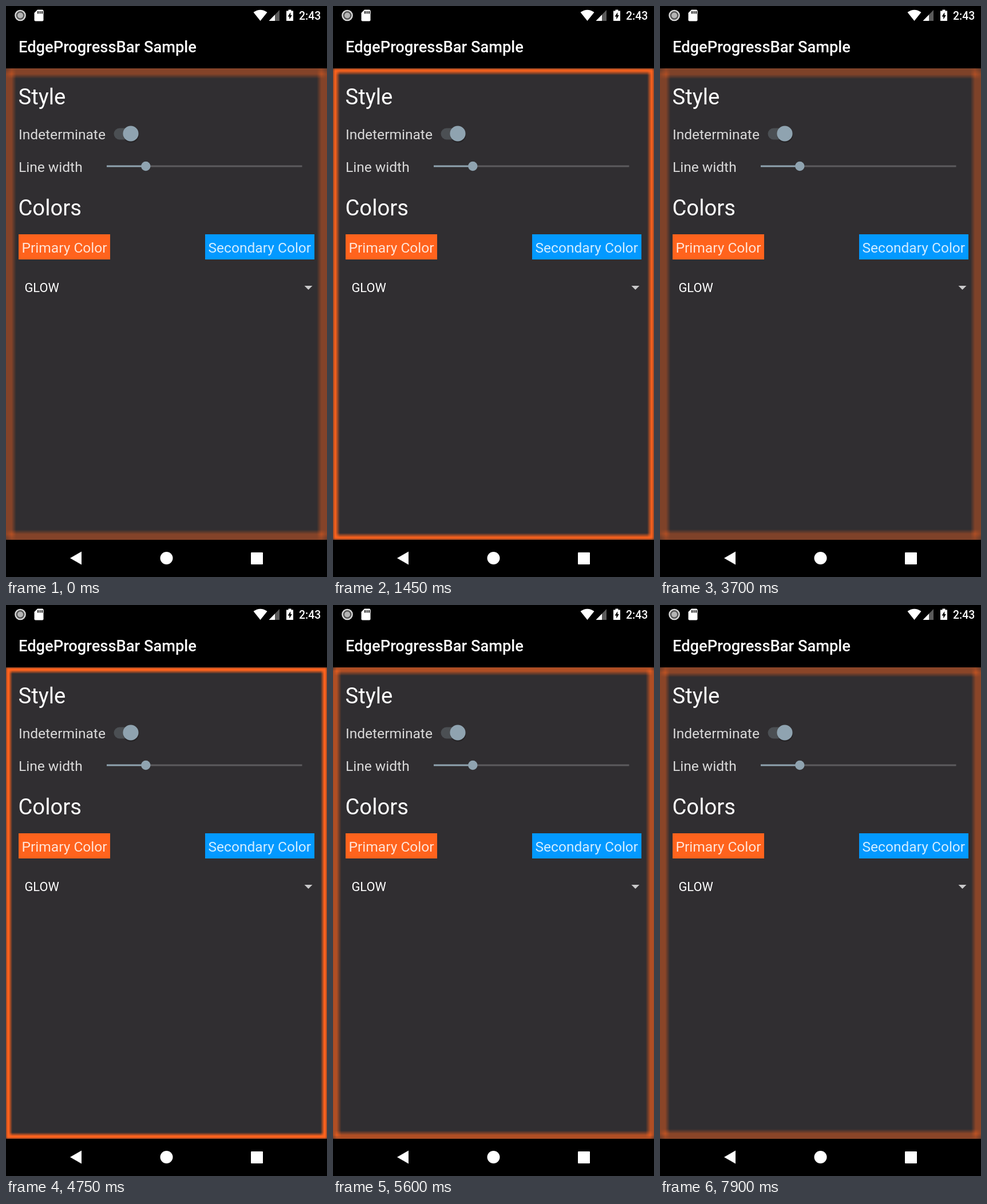
Animation of 561x998 px, one loop 8 s. Source, as an HTML page with a canvas:

```html
<!DOCTYPE html>
<html lang="en">
<head>
<meta charset="utf-8">
<title>EdgeProgressBar Sample</title>
<style>
  html, body { margin: 0; width: 100%; height: 100%; overflow: hidden; background: #000; }
  svg, canvas { position: absolute; left: 0; display: block; }
  svg { top: 0; }
  canvas { top: 109px; }
  text { font-family: Roboto, sans-serif; fill: #fff; }
  .body { font-size: 24.55px; fill: #fff; fill-opacity: .82; }
  .head { font-size: 38.2px; }
</style>
</head>
<body>
<svg width="561" height="998" viewBox="0 0 561 998">
  <rect width="561" height="998"/>
  <rect y="109" width="561" height="824" fill="#302e31"/>

  <!-- status bar -->
  <circle cx="25" cy="16.5" r="8.6" fill="#555" stroke="#d8d8d8" stroke-width="2.4"/>
  <circle cx="25" cy="16.5" r="5" fill="#b4b4b4"/>
  <path d="M55 6.500H63.500a2 2 0 0 1 2 2V24.500a2 2 0 0 1-2 2H51.500a2 2 0 0 1-2-2V12Z" fill="#fff"/>
  <path d="M56 9v4.500M59.500 9v4.500M63 9v4.500" stroke="#000" stroke-width="1.800"/>
  <path d="M432.500 11Q444.500 2.500 456.500 11L444.500 26Z" fill="#fff"/>
  <path d="M478 7V26H459.500Z" fill="#5a5a5a"/>
  <path d="M470 15.200V26H459.500Z" fill="#fff"/>
  <path d="M493.500 8.500V6.500H498.500V8.500H502V26H490V8.500Z" fill="#fff"/>
  <path d="M497.300 11L492.500 18.500H495.300V23.500L499.800 16H497.300Z"/>
  <text x="512" y="24" font-size="19.4" font-weight="500">2:43</text>

  <text x="22" y="81" font-size="27.3" font-weight="500">EdgeProgressBar Sample</text>

  <text class="head" x="21.500" y="172">Style</text>
  <text class="body" x="22" y="233">Indeterminate</text>
  <rect x="188.500" y="213.500" width="38" height="20" rx="10" fill="#4b4f53"/>
  <circle cx="218.500" cy="225" r="13.800" fill="#000" opacity=".25"/>
  <circle cx="218" cy="223" r="13.600" fill="#8fa3b0"/>

  <text class="body" x="22" y="290">Line width</text>
  <path d="M244 280H517.500" stroke="#5c5b5e" stroke-width="2.800"/>
  <path d="M176 280H244" stroke="#8fa3b0" stroke-width="2.800"/>
  <circle cx="244.300" cy="280" r="8.200" fill="#8fa3b0"/>

  <text class="head" x="21.500" y="366">Colors</text>
  <rect x="22" y="399" width="160" height="44" fill="#ff631d"/>
  <text class="body" x="27.500" y="431">Primary Color</text>
  <rect x="348" y="399" width="191" height="44" fill="#0399ff"/>
  <text class="body" x="353.500" y="431">Secondary Color</text>

  <text x="32.500" y="500" font-size="21.8">GLOW</text>
  <path d="M521.500 489H535.500L528.500 496Z" fill="#c9c9ca"/>

  <!-- navigation bar -->
  <path d="M112 965L132 953.500V976.500Z" fill="#fff"/>
  <circle cx="280.500" cy="965" r="11" fill="#fff"/>
  <rect x="428" y="955" width="21" height="21" rx="1" fill="#fff"/>
</svg>
<canvas id="glow" width="561" height="824"></canvas>
<script>
const LOOP = 8000, PEAK = 1125, PERIOD = 3880;
const W = 561, H = 824, LINE = 8, MAX_BLUR = 22.8, RING = 24;
const ctx = document.getElementById('glow').getContext('2d');
const img = ctx.createImageData(W, H);
for (let i = 0; i < img.data.length; i += 4) {
  img.data[i] = 255;
  img.data[i + 1] = 99;
  img.data[i + 2] = 29;
}

// The pulse stalls twice near the start before it runs freely.
function pulseTime(t) {
  if (t >= 750) return t;
  return Math.min(Math.max(t - 300, 0), 100);
}

function blurAt(t) {
  const phase = (((t - PEAK) % PERIOD) + PERIOD) % PERIOD;
  const u = Math.min(phase, PERIOD - phase) / (PERIOD / 2);
  return Math.max(2, MAX_BLUR * (1 - Math.pow(1 - u, 2.3)));
}

// Share of a box window around each pixel that lies inside [inset, size - inset].
function coverage(size, inset, blur) {
  return Float32Array.from({ length: size }, (_, p) => {
    const lo = Math.max(p + .5 - blur / 2, inset);
    const hi = Math.min(p + .5 + blur / 2, size - inset);
    return Math.max(0, hi - lo) / blur;
  });
}

// Box blur of a frame; the border counts as unlimited outside the stage edge.
function drawGlow(blur) {
  const ox = coverage(W, 0, blur), oy = coverage(H, 0, blur);
  const ix = coverage(W, LINE, blur), iy = coverage(H, LINE, blur);
  for (let y = 0; y < H; y++) {
    const middle = y >= RING && y < H - RING;
    for (let x = 0; x < W; x++) {
      if (middle && x === RING) x = W - RING;
      img.data[(y * W + x) * 4 + 3] = 255 * (ox[x] * oy[y] - ix[x] * iy[y]);
    }
  }
  ctx.putImageData(img, 0, 0);
}

function frame() {
  drawGlow(blurAt(pulseTime(performance.now() % LOOP)));
  requestAnimationFrame(frame);
}
frame();
</script>
</body>
</html>
```
